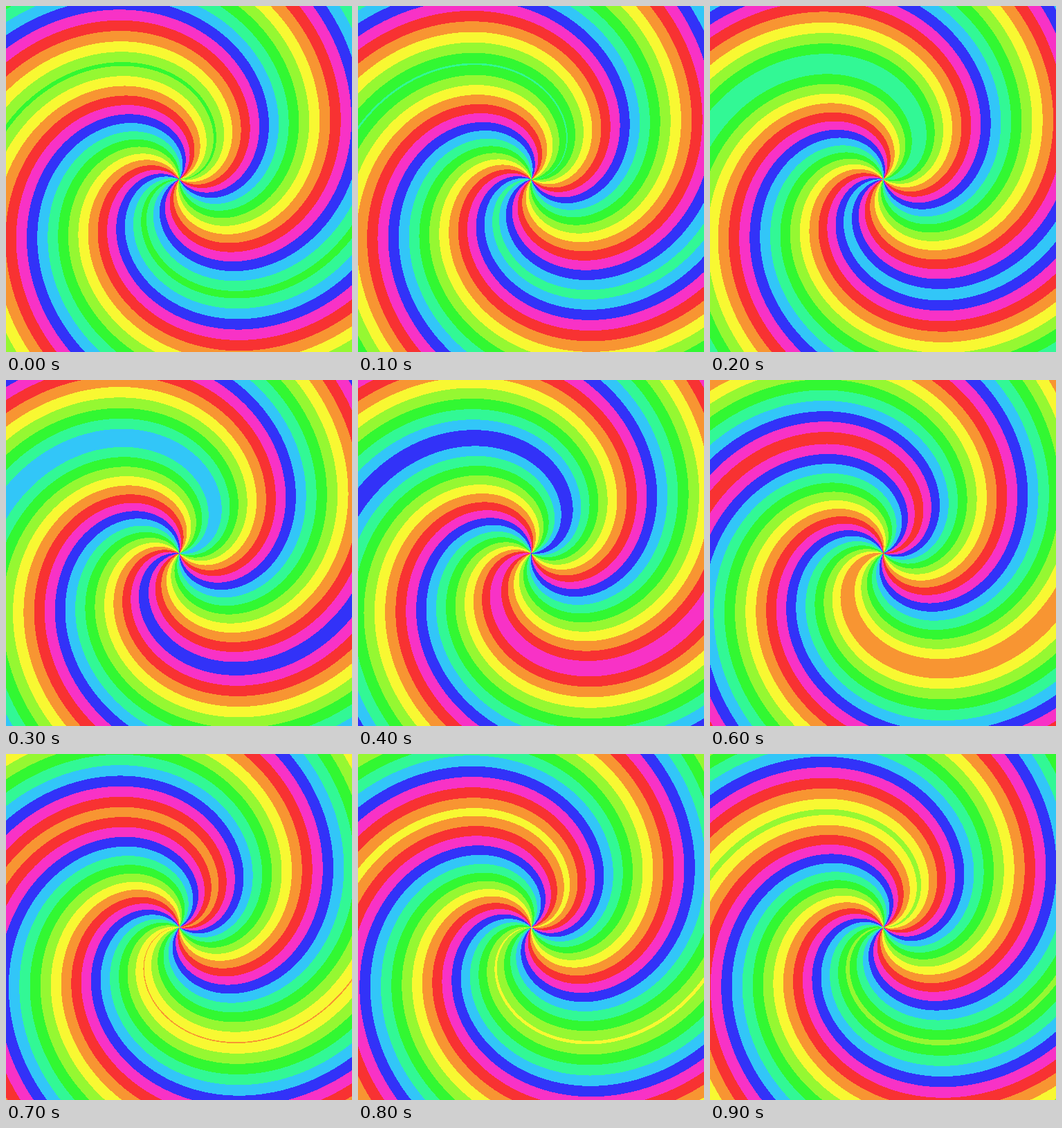
These frames come from a looping animation (500 by 500 pixels, 1 s). An HTML page with a canvas:

```html
<!DOCTYPE html>
<html lang="en">
<head>
<meta charset="utf-8">
<title>Rainbow swirl</title>
<style>
  html, body { margin: 0; width: 100%; height: 100%; overflow: hidden; }
  canvas { display: block; width: 100%; height: 100%; image-rendering: pixelated; }
</style>
</head>
<body>
<canvas id="stage" width="500" height="500"></canvas>
<script>
  const SIZE = 500;
  const LOOP = 1000;
  const STEPS = 10;
  const TWIST = 0.01092;  // radians of turn per pixel of radius
  const BANDS = 17.55;    // colour bands between the two fold lines
  const PEAK = 4.19;      // band value on the upper fold at time zero
  const TURN = 2 * Math.PI;

  const palette = [
    [248, 50, 50], [248, 149, 50], [248, 248, 50],
    [149, 248, 50], [50, 248, 50], [50, 248, 149],
    [50, 198, 248], [50, 50, 248], [248, 50, 198]
  ];
  const N = palette.length;

  const ctx = document.getElementById('stage').getContext('2d');
  const image = ctx.createImageData(SIZE, SIZE);
  const pixels = new Uint32Array(image.data.buffer);
  const packed = new Uint32Array(new Uint8Array(palette.flatMap(c => [...c, 255])).buffer);

  // Band value of a point: falls evenly from one fold spiral to the other.
  function bandAt(x, y) {
    const dx = x - SIZE / 2;
    const dy = SIZE / 2 - y;
    const a = Math.atan2(dy, dx) - TWIST * Math.hypot(dx, dy);
    const phi = Math.abs(a - TURN * Math.round(a / TURN));
    return PEAK - BANDS * phi / Math.PI + 2 * N;
  }

  const field = new Float32Array(SIZE * SIZE);
  for (let i = 0; i < field.length; i++) {
    field[i] = bandAt(i % SIZE, Math.floor(i / SIZE));
  }

  function draw(step) {
    const shift = step * N / STEPS;
    for (let i = 0; i < field.length; i++) {
      pixels[i] = packed[Math.floor(field[i] + shift) % N];
    }
    ctx.putImageData(image, 0, 0);
  }

  const start = performance.now();
  let shown = -1;

  function tick() {
    const t = (performance.now() - start) % LOOP;
    const step = Math.floor(t / LOOP * STEPS);
    if (step !== shown) draw(shown = step);
    requestAnimationFrame(tick);
  }
  tick();
</script>
</body>
</html>
```
